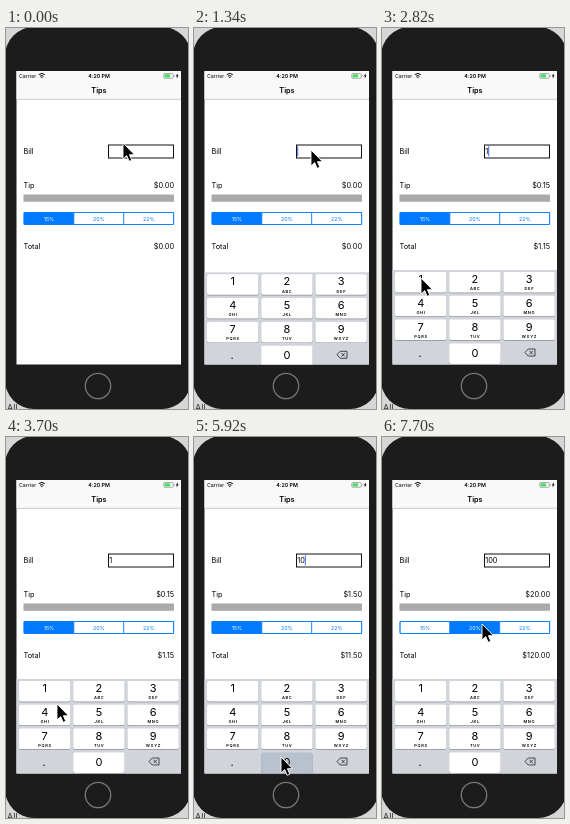
These frames come from a looping animation (182 px wide and 381 px high, 8 s). An HTML page:

```html
<!DOCTYPE html>
<html lang="en">
<head>
<meta charset="utf-8">
<title>Tip calculator</title>
<style>
html, body { margin: 0; width: 100%; height: 100%; overflow: hidden; background: #d6d6d6; }
svg { display: block; }
text { font: 7.3px Inter, "Liberation Sans", sans-serif; fill: #000; }
.mid { text-anchor: middle; }
.end { text-anchor: end; }
.bold { font-weight: 600; }
.small { font-size: 5.3px; }
.digit { font-size: 11px; }
.letters { font-size: 4px; font-weight: 600; letter-spacing: .7px; }
</style>
</head>
<body>
<svg id="stage" width="182" height="381" viewBox="0 0 182 381">
  <text x="1" y="383" style="font-size:9px;fill:#333">All</text>
  <rect x="-1" y="-1" width="186" height="382" rx="29" fill="#1c1c1c"/>
  <circle cx="92" cy="358" r="12.7" fill="#1c1c1c" stroke="#777" stroke-width="1.3"/>

  <svg x="10.5" y="43" width="164.5" height="293.5" viewBox="10.5 43 164.5 293.5">
    <rect x="10" y="43" width="166" height="294" fill="#fff"/>
    <rect x="10" y="43" width="166" height="28" fill="#f9f9f9"/>
    <path d="M10 71.3H176" stroke="#b4b4b4" stroke-width=".7"/>
    <text class="small" x="13" y="50">Carrier</text>
    <g fill="none" stroke="#000" stroke-width="1">
      <path d="M32.8 46.6Q35.8 44.2 38.8 46.6M34 48.3Q35.8 46.9 37.6 48.3"/>
      <path d="M35.2 49.6h1.2"/>
    </g>
    <text class="small bold mid" x="93" y="50">4:20 PM</text>
    <rect x="157.8" y="45.5" width="9.4" height="4.8" rx="1" fill="#fff" stroke="#777" stroke-width=".6"/>
    <rect x="158.6" y="46.3" width="5.6" height="3.2" fill="#4cd964"/>
    <path d="M168 47v1.8" stroke="#777" stroke-width=".7"/>
    <path d="M171.7 45.2L169.8 48.2H171L170.6 50.5L172.6 47.5H171.4Z"/>
    <text class="bold mid" x="93" y="64.5">Tips</text>

    <text x="17.5" y="126">Bill</text>
    <rect x="102.5" y="117" width="65" height="13" fill="#fff" stroke="#111" stroke-width="1"/>
    <text id="bill" x="103.2" y="126"></text>
    <rect id="caret" y="118.3" width="1" height="10" fill="#426bf2"/>
    <text x="17.5" y="159.5">Tip</text>
    <text id="tip" class="end" x="168" y="159.5"></text>
    <rect x="17.5" y="166.5" width="150.5" height="7.3" fill="#aaa"/>
    <g id="segments"></g>
    <rect x="18" y="184.5" width="149.7" height="12" rx="1.5" fill="none" stroke="#007aff" stroke-width=".8"/>
    <text x="17.5" y="220.5">Total</text>
    <text id="total" class="end" x="168" y="220.5"></text>

    <g id="keyboard"><rect x="10" y="242" width="166" height="96" fill="#d1d5db"/></g>
  </svg>
  <path id="pointer" d="M0 0V16L3.7 12.6L6.2 18.3L8.8 17.2L6.4 11.7H11.5Z" stroke="#fff" stroke-width=".9"/>
</svg>
<script>
const $ = id => document.getElementById(id);
const LOOP = 8000, STEPS = 54;
const rates = [15, 20, 22];
const letters = ["", "ABC", "DEF", "GHI", "JKL", "MNO", "PQRS", "TUV", "WXYZ"];

function add(parent, tag, attrs, content = "") {
  const el = document.createElementNS("http://www.w3.org/2000/svg", tag);
  for (const k in attrs) el.setAttribute(k, attrs[k]);
  el.textContent = content;
  return parent.appendChild(el);
}

const segments = rates.map((rate, i) => {
  const x = 18 + i * 49.9;
  const box = add($("segments"), "rect",
    {x, y: 184.5, width: 49.9, height: 12, stroke: "#007aff", "stroke-width": .7});
  const label = add($("segments"), "text", {x: x + 25, y: 192.5, class: "small mid"}, rate + "%");
  return {box, label};
});

const keys = {};
function addKey(name, col, row) {
  const x = 13 + col * 54.2, y = 244 + row * 23.8, mid = x + 25.7;
  add($("keyboard"), "rect", {x, y: y + 1, width: 51.4, height: 20.2, rx: 1.8, fill: "#8d9096"});
  keys[name] = add($("keyboard"), "rect", {x, y, width: 51.4, height: 20.5, rx: 1.8});
  add($("keyboard"), "text", {x: mid, y: y + (row < 3 ? 11.2 : 13.7), class: "digit mid"}, name);
  if (row < 3) add($("keyboard"), "text", {x: mid + .3, y: y + 18.4, class: "letters mid"}, letters[name - 1]);
}
for (let n = 1; n < 10; n++) addKey(n, (n - 1) % 3, Math.floor((n - 1) / 3));
addKey(0, 1, 3);
add($("keyboard"), "text", {x: 38, y: 328.5, class: "digit mid"}, ".");
add($("keyboard"), "path", {
  d: "M143 324.5L146.2 321H153V328H146.2ZM147.5 322.8L150.8 326.2M150.8 322.8L147.5 326.2",
  fill: "none", stroke: "#222", "stroke-width": .8
});

// Pointer stops: step, x, y
const stops = [
  [0, 117, 115], [1, 117, 115], [4, 117, 122], [9, 117, 122], [13, 67, 183],
  [16, 39, 250], [23, 39, 250], [25, 51, 267], [30, 87, 320], [44, 87, 320],
  [50, 100, 187], [STEPS, 100, 187]
];
const caretOn = [[9, 12], [15, 21], [26, 29], [32, 36], [39, 45], [48, 52]];

function pointerAt(n) {
  const i = stops.findIndex(s => s[0] > n);
  const [n0, x0, y0] = stops[i - 1], [n1, x1, y1] = stops[i];
  const k = (n - n0) / (n1 - n0);
  return [x0 + (x1 - x0) * k, y0 + (y1 - y0) * k];
}

function draw(n) {
  const bill = n < 18 ? "" : n < 32 ? "1" : n < 41 ? "10" : "100";
  const picked = n < 51 ? 0 : 1;
  const tip = bill * rates[picked] / 100;
  $("bill").textContent = bill;
  $("tip").textContent = "$" + tip.toFixed(2);
  $("total").textContent = "$" + (+bill + tip).toFixed(2);

  segments.forEach(({box, label}, i) => {
    box.style.fill = i === picked ? "#007aff" : "#fff";
    label.style.fill = i === picked ? "#fff" : "#007aff";
  });

  const pressed = n === 17 ? "1" : n === 31 || n === 40 ? "0" : "";
  for (const k in keys) keys[k].style.fill = k === pressed ? "#b9c2cc" : "#fff";
  $("keyboard").setAttribute("transform", `translate(0 ${n < 9 ? 100 : n === 9 ? 2.3 : 0})`);

  const width = bill ? $("bill").getComputedTextLength() : 0;
  $("caret").setAttribute("x", 103.2 + width);
  $("caret").style.opacity = caretOn.some(([a, b]) => n >= a && n < b) ? 1 : 0;
  $("pointer").setAttribute("transform", `translate(${pointerAt(n)})`);
}

const start = performance.now();
function tick() {
  const t = (performance.now() - start) % LOOP;
  // The small lead keeps step changes on the nearest 10 ms
  draw(Math.min(STEPS - 1, Math.floor((t + 8) * STEPS / LOOP)));
  requestAnimationFrame(tick);
}
tick();
</script>
</body>
</html>
```
